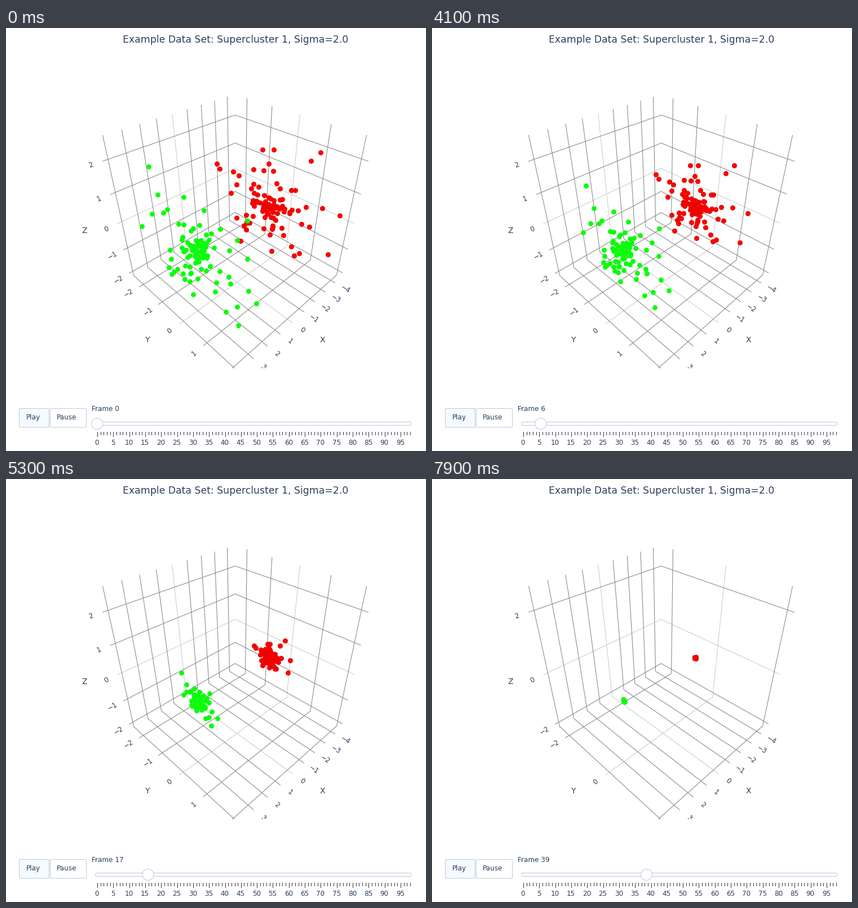
Write a matplotlib script that moves like this. It is 745x751 px and loops after 8 s.

```python
import numpy as np
import matplotlib.pyplot as plt
from matplotlib.animation import FuncAnimation
from matplotlib.patches import Circle, FancyBboxPatch, Rectangle

W, H, DPI = 745, 751, 100
PT = 72 / DPI  # points per pixel
INK, BORDER = "#2a3f5f", "#bec8d9"
GRID, ZERO = "#868686", "#cbcbcb"
STEPS, START, THIN_GRID = 80, 35, 65
SLOT = 5.663  # slider pixels per count

plt.rcParams["font.family"] = "DejaVu Sans"
fig = plt.figure(figsize=(W / DPI, H / DPI), dpi=DPI, facecolor="white")
ax = fig.add_axes([0, 0, 1, 1])
ax.set_xlim(-0.5, W - 0.5)
ax.set_ylim(H - 0.5, -0.5)
ax.axis("off")
scene = Rectangle((0, 40), W, 563.5, transform=ax.transData)
fine = []  # artists that vanish when the grid thins out


def label(x, y, s, size=12, **kw):
    return ax.text(x, y, s, fontsize=size * PT, color=INK, **kw)


def line(pts, value):
    art, = ax.plot(*pts.T, color=GRID if value else ZERO, lw=1.05 * PT,
                   zorder=1.5 if value else 1)
    art.set_clip_path(scene)
    return art


def tick(inner, outer, value):
    """Axis number beyond the outer end of a grid line, turned along it."""
    way = outer - inner
    x, y = outer + 22 * way / np.hypot(*way)
    turn = -np.degrees(np.arctan(way[1] / way[0]))
    art = label(x, y, str(value).replace("-", "\u2212"), rotation=turn,
                ha="center", va="center", zorder=3, clip_on=True)
    art.set_clip_path(scene)
    return art


def family(values, first, last, tick_end, numbered, thins):
    """Grid lines between two polylines, spaced as perspective asks."""
    first, last = np.array(first), np.array(last)
    depth = np.array([[1.26], [1.21], [1.25]])
    for v in values:
        s = (v - values[0]) / (values[-1] - values[0])
        pts = first + (last - first) * s / (s + (1 - s) * depth)
        arts = [line(pts, v)]
        if v in numbered:
            arts.append(tick(pts[1], pts[tick_end], v))
        if thins and v % 2:
            fine.extend(arts)


family(range(-4, 5), [(392, 122), (396, 341), (583, 452)],
       [(171, 190), (226, 439), (413, 611)], 2, range(-4, 4), False)
family(range(-2, 3), [(427, 125), (424, 345), (236, 459)],
       [(639, 190), (586, 438), (397, 607)], 2, range(-2, 2), True)
family(range(-2, 3), [(218, 435), (406, 327), (596, 434)],
       [(171, 236), (406, 154), (642, 236)], 0, range(-2, 3), True)

for s, x, y in (("X", 561, 554), ("Y", 251, 554), ("Z", 139, 360)):
    label(x, y, s, 14, ha="center", va="center")
label(406.5, 25, "Example Data Set: Supercluster 1, Sigma=2.0", 17.24, ha="center")


def box(x, y, w, h, fill="white"):
    ax.add_patch(FancyBboxPatch((x, y), w, h, boxstyle="round,pad=0,rounding_size=2",
                                fc=fill, ec=BORDER, lw=PT, zorder=4))


box(23, 675, 53, 33.5, "#f4faff")
box(78, 675, 64, 33.5)
label(47.5, 694.5, "Play", ha="center", zorder=5)
label(107.5, 694.5, "Pause", ha="center", zorder=5)
box(158.5, 699, 559.5, 6)
for i in range(99):
    x = 161 + i * SLOT
    major = i % 5 == 0
    ax.plot([round(x)] * 2, [716.5, 724 if major else 721], color="#333333", lw=PT)
    if major:
        label(x, 740, str(i), ha="center")
handle = ax.add_patch(Circle((161, 702), 10, fc="white", ec=BORDER, lw=PT, zorder=6))
caption = label(151, 680, "Frame 0")


class Cluster:
    """Dots around a centre: some key outliers plus a seeded random core."""

    def __init__(self, mid, spread, tilt, outliers, color, edge, z, seed):
        rng = np.random.default_rng(seed)
        core = rng.normal(size=(78, 2)).clip(-1.7, 1.7) * spread
        core *= rng.uniform(0.15, 1.6, (78, 1))
        core[:, 1] += tilt * core[:, 0]
        self.mid = np.array(mid)
        self.away = np.vstack([np.array(outliers) - self.mid, core])
        reach = np.hypot(*self.away.T)[:, None]
        self.pace = 1 - 0.18 * np.clip((reach - 95) / 45, 0, 1)  # far dots lag
        self.dots = ax.scatter([], [], s=(8.2 * PT) ** 2, c=color, edgecolors=edge,
                               linewidths=0.8 * PT, zorder=z)

    def shrink(self, n):
        t = n * self.pace
        ratio = np.exp(-0.04 * t - (t / 19) ** 2)
        self.dots.set_offsets(self.mid + self.away * ratio)


clusters = [
    Cluster((466, 317), (24, 20), 0.2, [
        (454, 215), (474, 215), (557, 220), (540, 235), (373, 240), (378, 249),
        (402, 254), (465, 240), (438, 250), (456, 252), (473, 253), (591, 332),
        (570, 401), (560, 319), (512, 287), (531, 317), (537, 352), (519, 399),
        (510, 403), (470, 395), (415, 377), (398, 292), (408, 277), (505, 387),
    ], "#ff0000", "#dc0000", 7, 4),
    Cluster((340, 393), (21, 23), 0.3, [
        (252, 245), (268, 295), (240, 351), (258, 329), (278, 327), (285, 321),
        (314, 299), (411, 527), (389, 503), (409, 494), (443, 488), (429, 466),
        (331, 472), (370, 467), (427, 409), (427, 341), (409, 376), (350, 323),
        (292, 409), (297, 432), (290, 393), (395, 394), (394, 441), (397, 453),
    ], "#00ff00", "#2cf52c", 8, 9),
]


def draw(i):
    run = i - START
    n = int(1.6 + 0.868 * run) if run >= 0 else 0
    pos = max(0.95, 0.3 + 0.872 * run) if run >= 0 else 0
    for cluster in clusters:
        cluster.shrink(n)
    handle.center = (161 + pos * SLOT, 702)
    caption.set_text(f"Frame {n}")
    for art in fine:
        art.set_visible(i < THIN_GRID)
    return []


anim = FuncAnimation(fig, draw, frames=STEPS, interval=100, repeat=True,
                     repeat_delay=0, init_func=lambda: draw(0))
plt.show()
```
